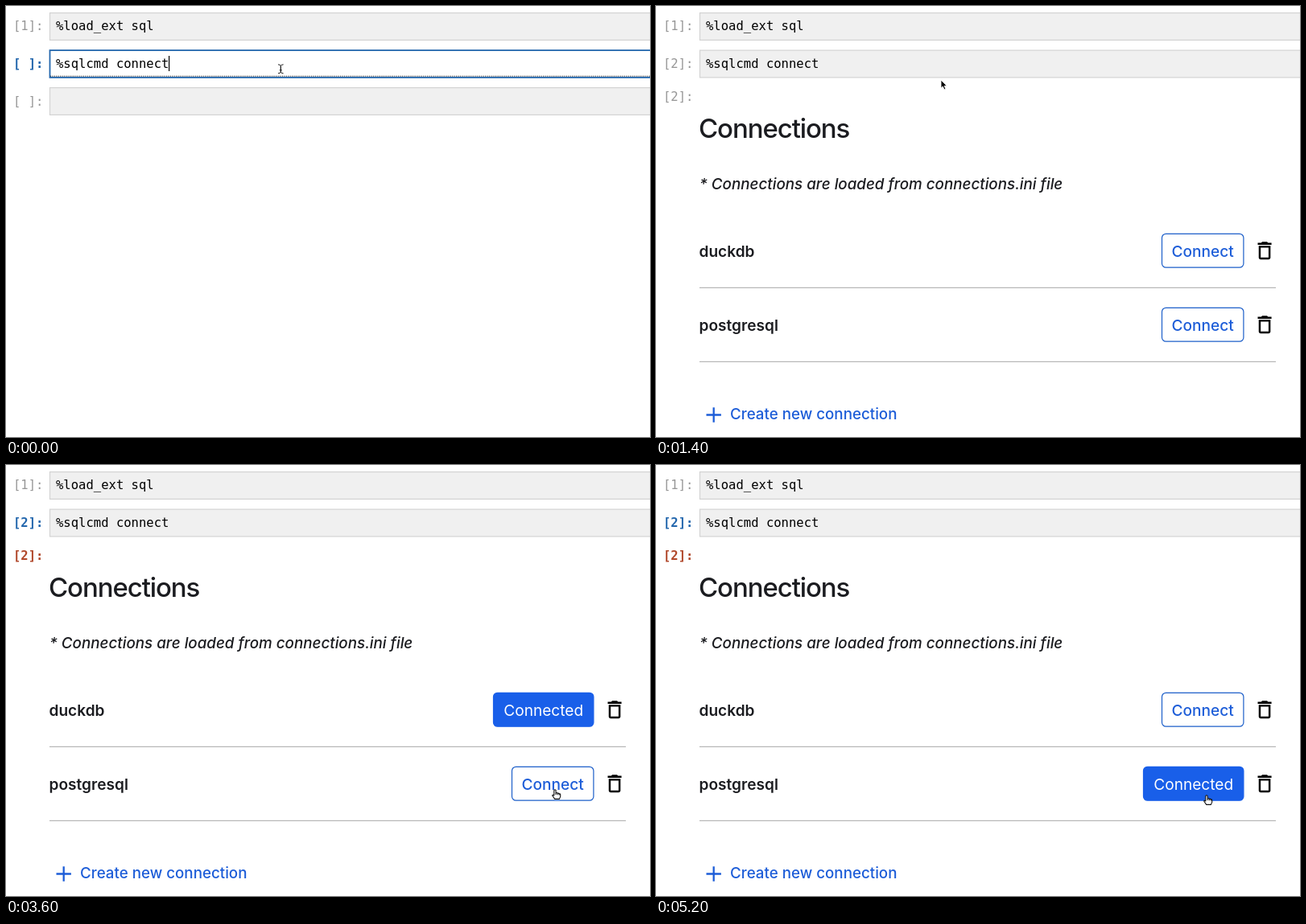
Animation, 800 px wide and 536 px high, one loop 5.3 s. Source, as an HTML page:

```html
<!DOCTYPE html>
<html lang="en">
<head>
<meta charset="utf-8">
<title>Notebook connections</title>
<style>
  html, body { margin: 0; width: 100%; height: 100%; overflow: hidden; background: #fff; }
  svg { display: block; width: 800px; height: 536px; }
  text { white-space: pre; font: 500 19.1px Inter, sans-serif; font-optical-sizing: none; fill: #1b1c20; }
  .code { font: 15.55px "DejaVu Sans Mono", monospace; fill: #000; }
  .prompt { font: 15.55px "DejaVu Sans Mono", monospace; text-anchor: end; fill: #979797; }
  .prompt.in { font-weight: bold; fill: #2467ad; }
  .prompt.out { font-weight: bold; fill: #b1492c; }
  .cell { fill: #f0f0f0; stroke: #d3d3d3; stroke-width: 1.2; }
  .cell.editing { fill: #fff; stroke: #2467ad; stroke-width: 1.8; }
  .title { font-weight: 550; font-size: 33px; letter-spacing: -1.1px; }
  .note { font-style: italic; font-size: 18.8px; }
  .name { font-weight: 580; }
  .rule { stroke: #b8b8b8; stroke-width: 1.2; }
  .button rect { fill: #fff; stroke: #1d5fc9; stroke-width: 1.2; }
  .button text { fill: #1d5dd8; text-anchor: middle; }
  .button.on rect { fill: #195fe9; stroke: #195fe9; }
  .button.on text { fill: #fff; font-weight: 400; }
  .link { fill: #1d5dd8; font-size: 18.75px; }
</style>
</head>
<body>
<svg id="stage" viewBox="0 0 800 536"></svg>
<script>
const LOOP = 5300, STEP = 100;
const RUN = 400, SHOW_POINTER = 1300, FIRST_CLICK = 2400, SECOND_CLICK = 4100;

// Pointer hot spot: time, x, y
const path = [
  [1300, 346, 83], [1400, 354, 92], [1500, 395, 140], [1800, 560, 248],
  [2100, 648, 298], [2300, 653, 303], [2900, 653, 303], [3400, 680, 397],
  [3600, 682, 404], [4000, 684, 410], [4500, 684, 410], [5200, 684, 411]
];

const cell = (id, y, code) => `
  <rect id="${id}" class="cell" x="54.5" y="${y}" width="760" height="33.8"/>
  <text class="code" x="62" y="${y + 21.5}">${code}</text>`;

const prompt = (id, y, label) =>
  `<text id="${id}" class="prompt" x="46.4" y="${y}">${label}</text>`;

const row = (id, y, name) => `
  <text class="name" x="53.5" y="${y + 7}">${name}</text>
  <g id="${id}" class="button">
    <rect y="${y - 21.2}" height="41.9" rx="5"/>
    <text y="${y + 7}"></text>
  </g>
  <path transform="translate(741.4 ${y - 14.9}) scale(1.22)" fill-rule="evenodd"
    d="M6 19c0 1.1.9 2 2 2h8c1.1 0 2-.9 2-2V7H6zM8 9h8v10H8zM15.5 4l-1-1h-5l-1 1H5v2h14V4z"/>
  <path class="rule" d="M54 ${y + 45.9}H770"/>`;

stage.innerHTML = `
  ${prompt("firstPrompt", 30.3, "[1]:")}
  ${cell("first", 8.6, "%load_ext sql")}
  ${prompt("inPrompt", 77, "[ ]:")}
  ${cell("second", 55.1, "%sqlcmd connect")}
  <g id="editor">
    <path d="M55 87.2H800" stroke="#222" stroke-dasharray="1.2 1.2"/>
    <rect id="caret" x="202" y="62" width="1.2" height="19"/>
    ${prompt("nextPrompt", 123.6, "[ ]:")}
    ${cell("third", 101.6, "")}
    <path d="M338 72.8q3.3 0 3.3 2v7q0 2-3.3 2M344.6 72.8q-3.3 0-3.3 2v7q0 2 3.3 2M339.8 79.8h3"
      fill="none" stroke="#222"/>
  </g>
  <g id="output">
    ${prompt("outPrompt", 117.5, "[2]:")}
    <text class="title" x="53" y="164">Connections</text>
    <text class="note" x="54" y="228">* Connections are loaded from connections.ini file</text>
    ${row("duck", 304.5, "duckdb")}
    ${row("postgres", 396.5, "postgresql")}
    <path d="M62.5 508.5h18.4M71.7 499.3v18.4" stroke="#1d5dd8" stroke-width="2.3"/>
    <text class="link" x="92" y="514.3">Create new connection</text>
  </g>
  <g id="pointer" stroke-linejoin="round">
    <path id="arrow" d="M0 0V10.2L2.3 8.1 4 12 5.9 11.2 4.2 7.4H7.3Z" stroke="#fff" stroke-width=".9"/>
    <path id="hand" d="M-1.2 6V.6Q0-1 1.1.6V4Q2.2 3 3.2 4.3 4.3 3.6 5.2 4.9 6.6 4.5 6.7 6V8.4L5.4 11.4H-.3L-3.2 7.2Q-3.4 5.4-1.2 7ZM1.1 4v2M3.2 4.3v2M5.2 4.9v1.6"
      fill="#fff" stroke="#111" stroke-width="1.1"/>
  </g>`;

const show = (node, on) => node.setAttribute("display", on ? "inline" : "none");

function setButton(node, on) {
  const left = on ? 605.5 : 628.5, right = 729.9;
  const [box, label] = node.children;
  node.classList.toggle("on", on);
  box.setAttribute("x", left);
  box.setAttribute("width", right - left);
  label.setAttribute("x", (left + right) / 2);
  label.textContent = on ? "Connected" : "Connect";
}

function pointerAt(t) {
  const i = path.findIndex(p => p[0] >= t);
  if (i < 1) return path[0].slice(1);
  const [t0, x0, y0] = path[i - 1], [t1, x1, y1] = path[i];
  const k = (t - t0) / (t1 - t0);
  return [x0 + (x1 - x0) * k, y0 + (y1 - y0) * k];
}

function draw(t) {
  const ran = t >= RUN, selected = t >= FIRST_CLICK;
  show(editor, !ran);
  show(caret, t < 200);
  show(output, ran);
  second.classList.toggle("editing", !ran);
  inPrompt.textContent = ran ? "[2]:" : "[ ]:";
  inPrompt.classList.toggle("in", !ran || selected);
  outPrompt.classList.toggle("out", selected);
  setButton(duck, selected && t < SECOND_CLICK);
  setButton(postgres, t >= SECOND_CLICK);

  const [x, y] = pointerAt(t);
  const overButton = x > 628 && (y > 283 && y < 326 || y > 375 && y < 418);
  show(pointer, t >= SHOW_POINTER);
  show(arrow, !overButton);
  show(hand, overButton);
  pointer.setAttribute("transform", `translate(${x} ${y})`);
}

function tick() {
  draw(Math.floor(performance.now() % LOOP / STEP) * STEP);
  requestAnimationFrame(tick);
}
tick();
</script>
</body>
</html>
```
